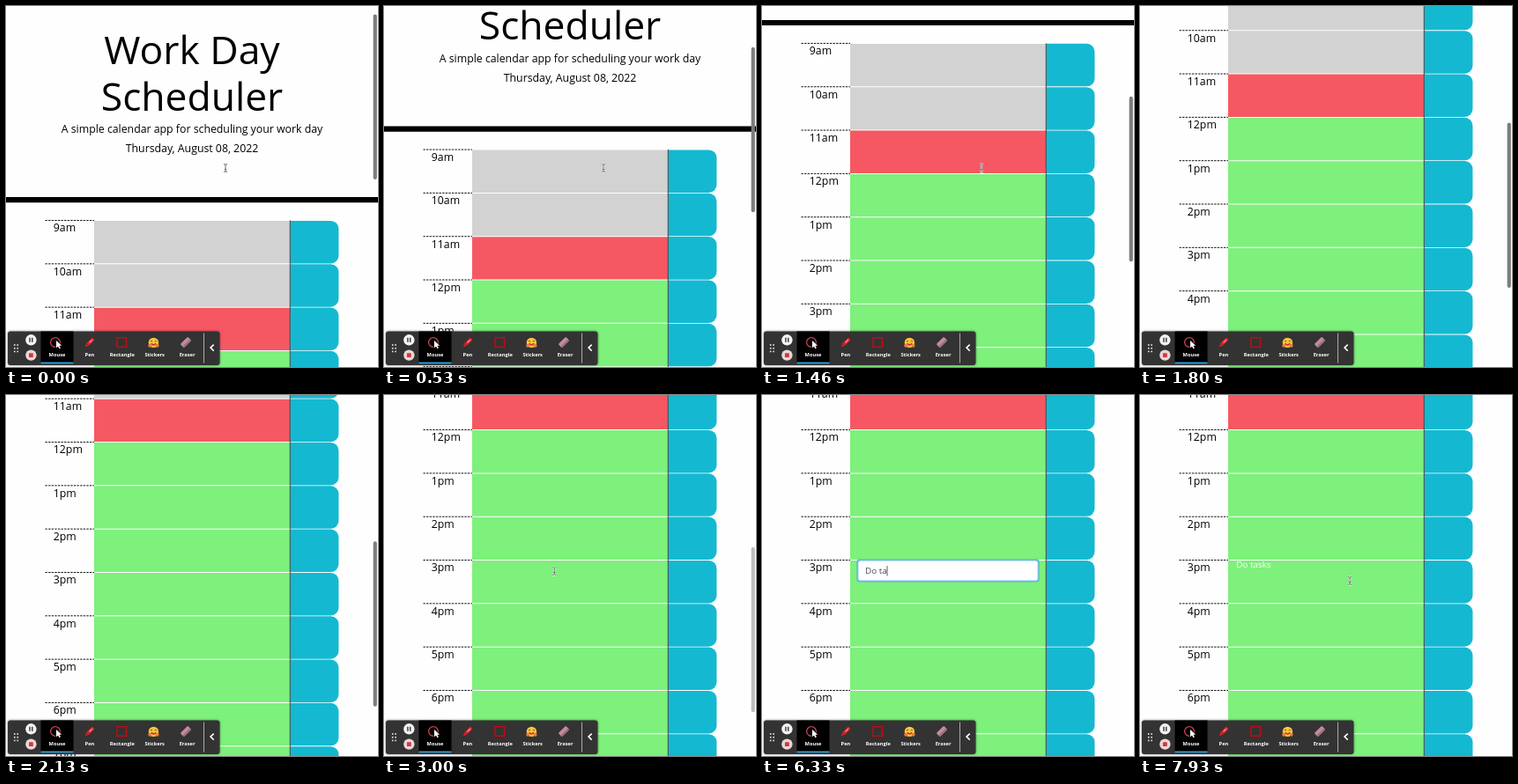
An HTML page with a canvas that plays this animation: 422 px wide and 410 px high, repeating every 8000 ms.

```html
<!DOCTYPE html>
<html lang="en">
<head>
<meta charset="utf-8">
<title>Work Day Scheduler</title>
<style>
html, body { margin: 0; width: 100%; height: 100%; overflow: hidden; background: #fefefe; }
canvas { display: block; }
</style>
</head>
<body>
<canvas id="stage" width="422" height="410"></canvas>
<script>
const ctx = document.getElementById('stage').getContext('2d');
const LOOP = 8000, STEP = 1000 / 15;
const ROW = 49.32, FIRST_ROW = 243.5, FONT = '"Open Sans", sans-serif';
const HOURS = ['9am', '10am', '11am', '12pm', '1pm', '2pm', '3pm', '4pm', '5pm', '6pm', '7pm'];
const GREY = '#d2d2d2', RED = '#f55863', GREEN = '#7ef07c', TEAL = '#14b9d1';

// [time, offset, speed] for the page scroll
const SCROLL = [[0, 0, .1], [1000, 156.5, .13], [1460, 200.4, .1], [2130, 337.4, .16], [2260, 351.9, 0]];
// [time, x, y] for the pointer
const POINTER = [[0, 249, 184], [2400, 249, 184], [3200, 183, 203], [7260, 183, 203], [7800, 238, 211]];
const KEYS = [5400, 5660, 5860, 6200, 6330, 6860, 6930, 7060];
const TASK = 'Do tasks', FOCUS = 3730, SAVE = 7600;

const clamp01 = v => Math.max(0, Math.min(1, v));
const smooth = u => u * u * (3 - 2 * u);

function segment(points, t) {
  const i = points.findIndex(p => p[0] > t);
  return i < 0 ? [points.at(-1), points.at(-1), 0]
    : [points[i - 1], points[i], (t - points[i - 1][0]) / (points[i][0] - points[i - 1][0])];
}

function scrollAt(t) {
  const [a, b, u] = segment(SCROLL, t), d = b[0] - a[0], s = smooth(u);
  return a[1] * (1 - s) + b[1] * s + d * u * (1 - u) * (a[2] * (1 - u) - b[2] * u);
}

function pointerAt(t) {
  const [a, b, u] = segment(POINTER, t), s = smooth(u);
  return [a[1] + (b[1] - a[1]) * s, a[2] + (b[2] - a[2]) * s];
}

function rect(x, y, w, h, fill, radius = 0) {
  ctx.beginPath();
  ctx.roundRect(x, y, w, h, radius);
  ctx.fillStyle = fill;
  ctx.fill();
}

function dot(x, y, r, fill) {
  ctx.beginPath();
  ctx.arc(x, y, r, 0, 2 * Math.PI);
  ctx.fillStyle = fill;
  ctx.fill();
}

function stroke(d, color, width, dash = []) {
  ctx.strokeStyle = color;
  ctx.lineWidth = width;
  ctx.setLineDash(dash);
  ctx.stroke(new Path2D(d));
  ctx.setLineDash([]);
}

function text(str, x, y, size, fill, align = 'left', weight = 400) {
  ctx.font = `${weight} ${size}px ${FONT}`;
  ctx.textAlign = align;
  ctx.fillStyle = fill;
  ctx.fillText(str, x, y);
}

function at(x, y, angle, draw) {
  ctx.save();
  ctx.translate(x, y);
  ctx.rotate(angle);
  draw();
  ctx.restore();
}

function arrow(x, y, fill, edge) {
  at(x, y, 0, () => {
    const d = 'M0 0V8.2L2 6.4L3.4 9.3L4.9 8.6L3.5 5.8H6.2Z';
    stroke(d, edge, 1.2);
    ctx.fillStyle = fill;
    ctx.fill(new Path2D(d));
  });
}

function iBeam(x, y) {
  at(x, y, 0, () => {
    const d = 'M-2 -4.5Q0 -4.5 0 -3Q0 -4.5 2 -4.5M0 -3V3M-2 4.5Q0 4.5 0 3Q0 4.5 2 4.5M-1.2 1.5H1.2';
    stroke(d, '#f4f4f4', 2.2);
    stroke(d, '#666', .9);
  });
}

function drawHeader() {
  text('Work Day', 211, 65.5, 44.4, '#000', 'center');
  text('Scheduler', 211, 118.7, 44.4, '#000', 'center');
  text('A simple calendar app for scheduling your work day', 211, 144, 12.3, '#000', 'center');
  text('Thursday, August 08, 2022', 211, 166, 12.3, '#000', 'center');
  rect(0, 217, 422, 6.2, '#000');
}

function drawRow(hour, i) {
  const y = FIRST_ROW + i * ROW;
  stroke(`M44.5 ${y}H100`, '#111', 1, [2.4, 1.2]);
  text(hour, 53.8, y + 12.9, 12.3, '#000');
  rect(100, y + .5, 222, ROW - 1, i < 2 ? GREY : i === 2 ? RED : GREEN);
  rect(321.8, y, 1, ROW, '#222');
  rect(322.8, y + .4, 54.6, ROW - .8, TEAL, [0, 9, 9, 0]);
}

function drawTask(t) {
  const y = FIRST_ROW + 6 * ROW;
  if (t >= SAVE) return text(TASK, 109.2, y + 8.6, 9.85, '#fff');
  if (t < FOCUS) return;
  rect(107.2, y - 1.3, 207.6, 26.6, '#5fc4b4', 4);
  rect(108.6, y + .1, 204.8, 23.8, '#80bdff', 2.8);
  rect(109.4, y + .9, 203.2, 22.2, '#fff', 2.2);

  const typed = TASK.slice(0, KEYS.filter(k => k <= t + 7).length);
  text(typed || 'Enter your tasks here!', 117, y + 15.5, 9.85, typed ? '#495057' : '#6c757d');
  const lastKey = KEYS.filter(k => k <= t + 7).at(-1) ?? FOCUS;
  if (Math.floor((t - lastKey + 30) / 500) % 2 === 0) {
    const width = typed ? ctx.measureText(typed).width : 0;
    rect(117 + width, y + 6.5, .8, 11.5, '#333');
  }
}

function drawScrollbar(scroll, t) {
  ctx.globalAlpha = 1 - clamp01((t - 2850) / 300);
  rect(416.6, 9.5 + scroll * .464, 4.2, 187.5, '#7c7c7c', 2.1);
  ctx.globalAlpha = 1;
}

function drawPointer(t) {
  const [x, y] = pointerAt(t);
  if (t > 1800 && t < 2400 || t >= KEYS[0] - 7 && t < 7260) return;
  if (t >= FOCUS && t < SAVE) arrow(x - 1, y - 2.5, '#111', '#fff');
  else iBeam(x, y);
}

function drawToolbar() {
  ctx.shadowColor = 'rgba(0,0,0,.45)';
  ctx.shadowBlur = 3;
  rect(2, 369.5, 240.5, 38.5, '#333', 3);
  ctx.shadowBlur = 0;

  for (let i = 0; i < 6; i++) dot(9.8 + i % 2 * 3.4, 385 + (i >> 1) * 3.7, .95, '#ddd');
  dot(28.4, 379.3, 6.2, '#f2f2f2');
  rect(26.3, 376.8, 1.4, 5, '#333');
  rect(29.1, 376.8, 1.4, 5, '#333');
  dot(28.4, 396.6, 6.2, '#ead6d6');
  rect(26, 394.2, 4.8, 4.8, '#d33642', .6);

  rect(39.5, 369.5, 37, 36.5, '#000');
  rect(39.5, 404.6, 37, 1.6, '#2b9fd9');
  ['Mouse', 'Pen', 'Rectangle', 'Stickers', 'Eraser'].forEach((label, i) =>
    text(label, 58 + i * 36.9, 398.4, 5.7, '#fff', 'center', 700));

  ctx.beginPath();
  ctx.arc(56, 382, 5.4, 0, 2 * Math.PI);
  ctx.strokeStyle = '#c8444f';
  ctx.lineWidth = 1.3;
  ctx.stroke();
  arrow(57, 380, '#fff', '#000');

  at(95, 382, Math.PI / 4, () => {
    rect(-1.9, -6, 3.8, 8.3, '#e0242c', .8);
    rect(-.6, -4, 1.2, 4.5, '#f8a0a0');
    stroke('M-1.5 2.5L0 6L1.5 2.5Z', '#e0242c', 1);
  });
  stroke('M126 376.8H136.6V387.2H126Z', '#b80f16', 1.5);

  dot(167.4, 382.4, 5.7, '#f8c63d');
  stroke('M163.9 381Q165 379.6 166.1 381M168.7 381Q169.8 379.6 170.9 381', '#5b3517', .8);
  stroke('M164.8 383.3Q167.4 386.5 170 383.3', '#c62a2a', 1.5);
  dot(163.2, 385.7, 2, '#ee7b38');
  dot(171.6, 385.7, 2, '#ee7b38');

  at(204, 382, -Math.PI / 4, () => {
    rect(-6, -2.9, 12, 5.8, '#c58b9b', 1.2);
    rect(-6, .8, 12, 2.1, '#94707c', 1);
  });
  rect(224, 371.5, 1, 34, '#aaa');
  stroke('M235.7 384.6L232 388.1L235.7 391.6', '#fff', 1.5);
}

function draw() {
  const t = Math.floor((performance.now() % LOOP + 7) / STEP) * STEP % LOOP;
  const scroll = scrollAt(t);
  rect(0, 0, 422, 410, '#fefefe');
  at(0, -scroll, 0, () => {
    drawHeader();
    HOURS.forEach(drawRow);
    drawTask(t);
  });
  drawScrollbar(scroll, t);
  drawPointer(t);
  drawToolbar();
  requestAnimationFrame(draw);
}
draw();
</script>
</body>
</html>
```
